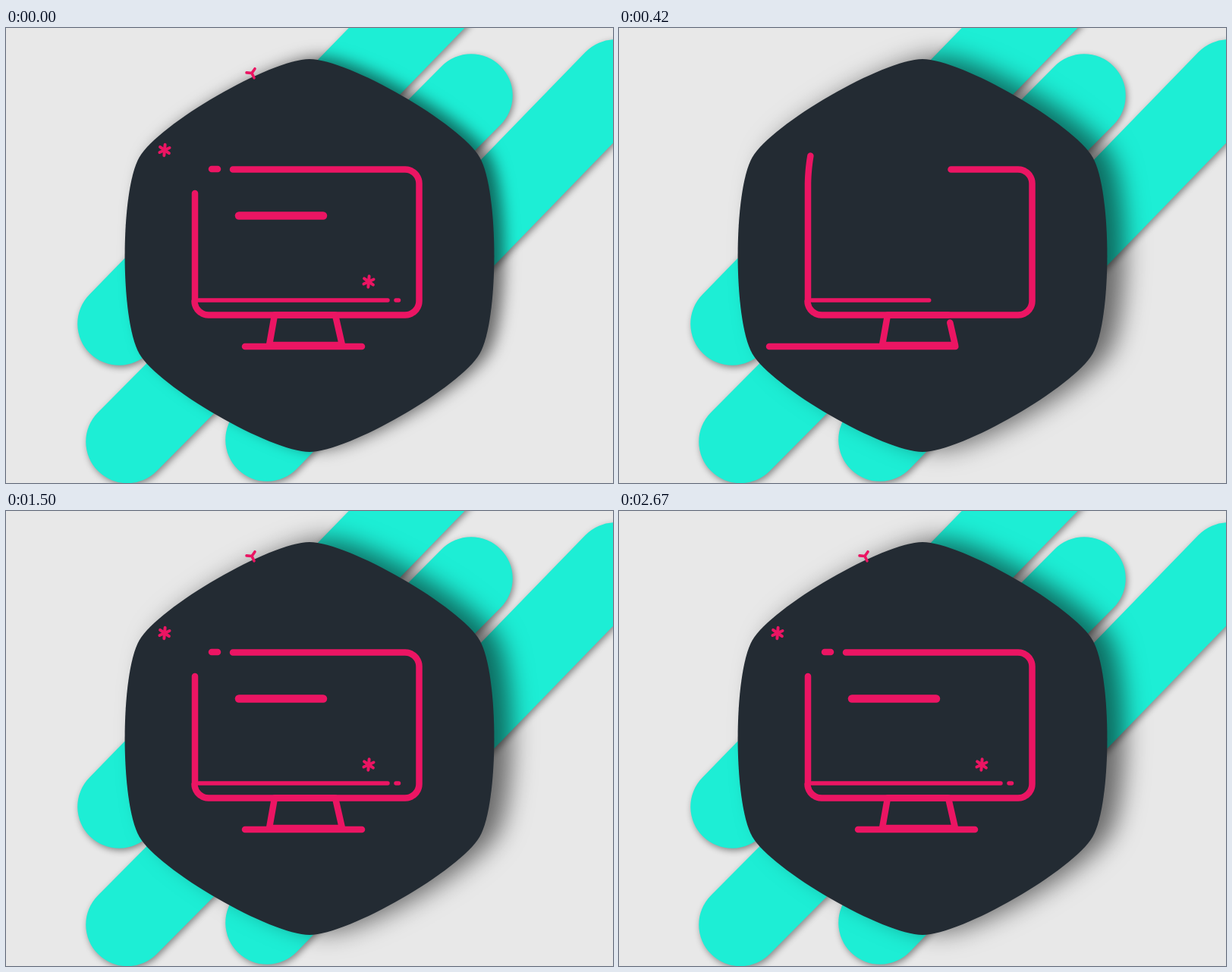
An HTML page with a canvas that plays this animation: 800 px wide and 600 px high, repeating every 2730 ms.

```html
<!DOCTYPE html>
<html lang="en">
<head>
<meta charset="utf-8">
<title>Monitor icon</title>
<style>
html, body { margin: 0; width: 100%; height: 100%; overflow: hidden; background: #e8e8e8; }
canvas { display: block; }
</style>
</head>
<body>
<canvas width="800" height="600"></canvas>
<script>
const canvas = document.querySelector('canvas');
const ctx = canvas.getContext('2d');
const LOOP = 2730, STEP = 30, LAST = 89;
const PINK = '#eb1563', TEAL = '#1deed5', DARK = '#232b33';

const mix = (a, b, k) => a + (b - a) * k;
const mixPoint = (p, q, k) => [mix(p[0], q[0], k), mix(p[1], q[1], k)];
const easeOut = (step, start, duration) => {
  const u = Math.min(1, Math.max(0, (step - start) / duration));
  return 1 - (1 - u) ** 2;
};

function sample(count, fn) {
  return Array.from({ length: count + 1 }, (_, i) => fn(i / count));
}

function bezier(a, b, c, d) {
  return sample(40, t => mixPoint(
    mixPoint(mixPoint(a, b, t), mixPoint(b, c, t), t),
    mixPoint(mixPoint(b, c, t), mixPoint(c, d, t), t), t));
}

function arc(x, y, r, from, to) {
  return sample(10, t => {
    const a = mix(from, to, t);
    return [x + r * Math.cos(a), y + r * Math.sin(a)];
  });
}

function lengthOf(points) {
  let sum = 0;
  for (let i = 1; i < points.length; i++) {
    sum += Math.hypot(points[i][0] - points[i - 1][0], points[i][1] - points[i - 1][1]);
  }
  return sum;
}

// Strokes the part of a polyline between two distances along it.
function strokePart(points, width, from, to) {
  if (to - from < 0.1) return;
  ctx.lineWidth = width;
  ctx.setLineDash([to - from, 5000]);
  ctx.lineDashOffset = -from;
  ctx.beginPath();
  points.forEach(p => ctx.lineTo(...p));
  ctx.stroke();
  ctx.setLineDash([]);
}

function bar(x1, x2, y, width, grow) {
  if (grow > 0) strokePart([[x1, y], [x2, y]], width, 0, (x2 - x1) * grow);
}

function setShadow(color, blur, x, y) {
  ctx.shadowColor = color;
  ctx.shadowBlur = blur;
  ctx.shadowOffsetX = x;
  ctx.shadowOffsetY = y;
}

function drawStripes() {
  setShadow('rgba(0,0,0,.42)', 9, 2, 3);
  ctx.strokeStyle = TEAL;
  ctx.lineWidth = 109.5;
  for (const [x1, y1, x2, y2] of [
    [149, 390, 567, -40], [160, 545.5, 613, 89], [344, 543, 803, 70]
  ]) {
    ctx.beginPath();
    ctx.moveTo(x1, y1);
    ctx.lineTo(x2, y2);
    ctx.stroke();
  }
}

function drawBadge(tightShadow) {
  const radius = 259, handle = 51;
  const corner = (i, offset) => {
    const a = (i * 60 - 90) * Math.PI / 180;
    return [400 + radius * Math.cos(a) - offset * Math.sin(a),
            300 + radius * Math.sin(a) + offset * Math.cos(a)];
  };
  if (tightShadow) setShadow('rgba(0,0,0,.55)', 20, 13, -3);
  else setShadow('rgba(0,0,0,.55)', 32, 23, -4);
  ctx.fillStyle = DARK;
  ctx.beginPath();
  ctx.moveTo(...corner(0, 0));
  for (let i = 0; i < 6; i++) {
    ctx.bezierCurveTo(...corner(i, handle), ...corner(i + 1, -handle), ...corner(i + 1, 0));
  }
  ctx.fill();
  setShadow('transparent', 0, 0, 0);
}

function drawScreen(step) {
  const settle = easeOut(step, 5, 6);
  const joint = mixPoint([260, 190], [249, 205], settle);
  const entry = bezier([340, 60],
    mixPoint([285, 75], [270, 75], settle),
    mixPoint([268, 120], [250, 150], settle), joint);
  const q = Math.PI / 2;
  const outline = [
    ...entry,
    mixPoint([241.5, 360], [249, 360], settle),
    ...arc(267, 360, 18.5, 2 * q, q),
    ...arc(526, 360, 18.5, q, 0),
    ...arc(526, 205, 18.5, 0, -q),
    [299, 186.5]
  ];
  const head = lengthOf(outline) * easeOut(step, 2.35, 18.2);
  const tail = (lengthOf(entry) + 13) * easeOut(step, 8, 12);
  strokePart(outline, 8.5, tail, head);
  bar(271, 279, 186, 8.5, easeOut(step, 19, 4));
  bar(307, 418, 247.5, 10.5, easeOut(step, 14, 8));
  bar(254, 503, 359, 5.5, easeOut(step, 9, 13));
  bar(514, 517.5, 359, 5.5, step < 22 ? 0 : 0.05 + 0.95 * easeOut(step, 23, 4));
}

function drawStand(step) {
  const legs = [[434, 378.5], [354, 378.5], [347, 418], [443, 418], [434, 378.5]];
  strokePart(legs, 8.5, 0, lengthOf(legs) * easeOut(step, 6, 10));
  const base = [[198, 420], [469, 420]];
  strokePart(base, 8.5, 117 * easeOut(step, 17, 6), 271 * easeOut(step, 5, 13));
}

function drawSpark(x, y, arms, size, width, firstAngle, step) {
  const shown = Math.min(arms, (step - 18) * (arms === 6 ? 1 : arms / 5));
  if (shown <= 0) return;
  const turn = 67 * (1 - easeOut(step, 16, 18)) - 25;
  ctx.lineWidth = width;
  for (let i = 0; i < shown; i++) {
    const reach = size * Math.min(1, shown - i);
    const a = (firstAngle + i * 360 / arms + turn) * Math.PI / 180;
    ctx.beginPath();
    ctx.moveTo(x, y);
    ctx.lineTo(x + reach * Math.cos(a), y + reach * Math.sin(a));
    ctx.stroke();
  }
}

function draw(index) {
  const step = index || LAST;
  ctx.lineCap = ctx.lineJoin = 'round';
  ctx.fillStyle = '#e8e8e8';
  ctx.fillRect(0, 0, 800, 600);
  drawStripes();
  drawBadge(index === 0);
  ctx.strokeStyle = PINK;
  drawScreen(step);
  drawStand(step);
  drawSpark(209, 161, 6, 7.2, 4, 60, step);
  drawSpark(478, 334.5, 6, 7.2, 4, 60, step);
  drawSpark(324, 59.5, 3, 7, 3.6, 90, step);
}

let shownIndex = -1;
const startTime = performance.now();
function tick() {
  const time = (performance.now() - startTime) % LOOP;
  const index = Math.min(LAST, Math.floor(time / STEP));
  if (index !== shownIndex) draw(shownIndex = index);
  requestAnimationFrame(tick);
}
tick();
</script>
</body>
</html>
```
